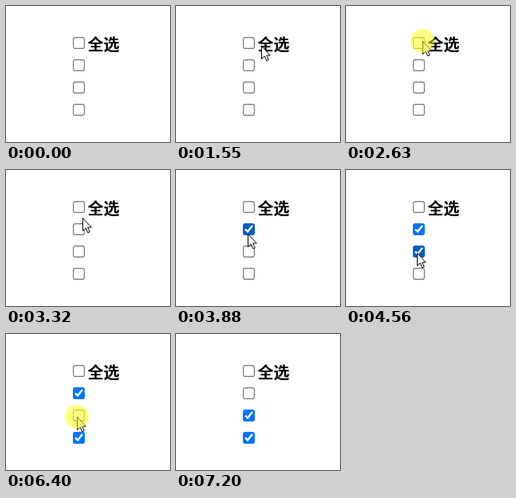
Recreate the animation shown at these times as an HTML page. Size 206x171 px, loop 7940 ms.

```html
<!DOCTYPE html>
<html lang="zh">
<head>
<meta charset="utf-8">
<title>全选</title>
<style>
  html, body { margin: 0; width: 100%; height: 100%; overflow: hidden; background: #fff; }
  svg { display: block; width: 100%; height: 100%; }
  text { font: bold 20px "Noto Sans CJK SC", "Noto Sans CJK", sans-serif; fill: #000; }
  .box rect { fill: #fff; stroke: #767676; stroke-width: 1.15; }
  .box path { fill: none; stroke: #fff; stroke-width: 2.4; visibility: hidden; }
  .box.hover rect { stroke: #4f4f4f; }
  .box.down rect { stroke: #8d8d8d; }
  .box.on rect { fill: #0075ff; stroke: #0075ff; }
  .box.on.hover rect { fill: #005cc8; stroke: #005cc8; }
  .box.on.down rect { fill: #3793ff; stroke: #3793ff; }
  .box.on path { visibility: visible; }
  #arrow { fill: #fff; stroke: #000; stroke-width: 1; }
  #glow { fill: #ff0; fill-opacity: .5; }
</style>
</head>
<body>
<svg viewBox="0 0 206 171">
  <g id="boxes"></g>
  <text x="102.5" y="55.5">全选</text>
  <g id="pointer">
    <path id="arrow" d="M.5 .5V16.5L4.2 13L6.8 18.9L9.2 17.8L6.7 12.1H11.3Z"/>
    <circle id="glow" r="15"/>
  </g>
</svg>
<script>
const LOOP = 7940, TICK = 70;
const LEFT = 84, TOP = 39, SIZE = 15, GAP = 28;
const moves = [], clicks = [];

// Each glide starts where the one before it ended.
const glide = (start, end, x, y) => moves.push({ start, end, x, y });
const jump = (t, x, y) => glide(t, t, x, y);
const leave = t => jump(t, 300, 300);
const click = (t, box, lit = true) => clicks.push({ t, box, lit });

leave(0);
jump(200, 204, 169);
leave(270);
jump(540, 171, 169);
leave(670);

// Swing past the heading, come back to the first box
jump(870, 165, 151);
glide(870, 1190, 71, 19);
glide(1190, 1550, 107, 50);
glide(1620, 1830, 96, 44);
click(2030, 0);
click(2360, 0);
click(2630, 0);
click(3050, 0, false);

// Tick the other boxes one by one
glide(3250, 3320, 96, 60);
glide(3320, 3530, 90, 76);
click(3600, 1);
glide(3810, 4020, 91, 91);
glide(4220, 4360, 89, 104);
click(4430, 2);
glide(4560, 4840, 93, 133);
click(5240, 3);
glide(5380, 5570, 106, 128);
leave(5640);

// Return and clear
jump(5840, 171, 122);
glide(5840, 6050, 89, 104);
click(6110, 2);
click(6380, 2);
glide(6450, 6600, 99, 81);
glide(6600, 6670, 91, 74);
click(6930, 1);
leave(7200);

const $ = id => document.getElementById(id);
const ease = p => p * p * (3 - 2 * p);
const topOf = i => TOP + i * GAP;

$("boxes").innerHTML = [0, 1, 2, 3].map(i =>
  `<g class="box" transform="translate(${LEFT} ${topOf(i)})">
    <rect x=".6" y=".6" width="13.8" height="13.8" rx="2.5"/>
    <path d="M3 7.5L6 10.5L12 3"/></g>`).join("");
const boxes = [...document.querySelectorAll(".box")];

function tipAt(t) {
  const k = moves.findLastIndex(m => m.start <= t);
  const to = moves[k], from = moves[k - 1] || to;
  const held = Math.floor((t - to.start) / TICK + 0.1) * TICK;
  const p = t >= to.end ? 1 : ease(Math.min(1, held / (to.end - to.start)));
  const mix = key => Math.round(from[key] + (to[key] - from[key]) * p);
  return { x: mix("x"), y: mix("y") };
}

function checksAt(t) {
  const on = [false, false, false, false];
  for (const c of clicks.filter(c => c.t + TICK <= t)) {
    on[c.box] = !on[c.box];
    if (c.box === 0) on.fill(on[0]);
    else on[0] = on.slice(1).every(Boolean);
  }
  return on;
}

function draw(t) {
  const tip = tipAt(t), on = checksAt(t);
  const press = clicks.find(c => t >= c.t && t < c.t + TICK);
  const inside = (v, edge) => v >= edge && v <= edge + SIZE;
  boxes.forEach((box, i) => {
    box.classList.toggle("on", on[i]);
    box.classList.toggle("hover", inside(tip.x, LEFT) && inside(tip.y, topOf(i)));
    box.classList.toggle("down", press?.box === i);
  });
  $("pointer").setAttribute("transform", `translate(${tip.x} ${tip.y})`);
  $("glow").style.display = press?.lit ? "" : "none";
}

const begin = performance.now();
function tick() {
  draw((performance.now() - begin) % LOOP);
  requestAnimationFrame(tick);
}
tick();
</script>
</body>
</html>
```
